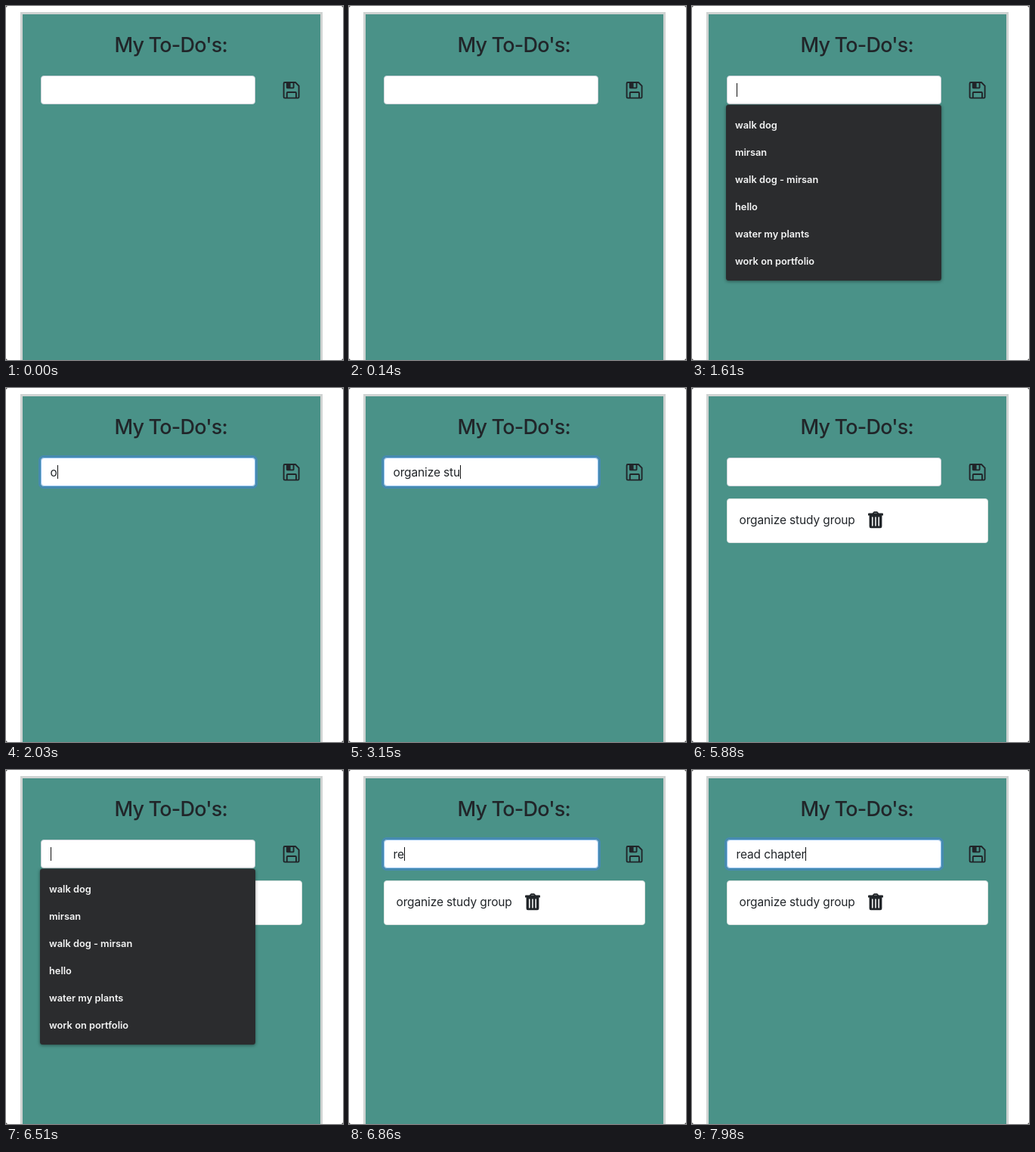
These frames come from a looping animation (446 by 468 pixels, 8000 ms). An HTML page:

```html
<!DOCTYPE html>
<html lang="en">
<head>
<meta charset="utf-8">
<title>To-do list</title>
<style>
  html, body { margin: 0; width: 100%; height: 100%; overflow: hidden; background: #fff; }
  svg { display: block; width: 446px; height: 468px; }
  text { font-family: Inter, sans-serif; font-optical-sizing: none; fill: #212529; white-space: pre; }
  .title { font-size: 27px; font-weight: 500; letter-spacing: -.8px; text-anchor: middle; }
  .body { font-size: 15.5px; letter-spacing: -.13px; }
  .menu text { font-size: 12.8px; font-weight: 600; fill: #f4f5f5; }
  .menu rect { filter: drop-shadow(0 1px 2px rgba(0, 0, 0, .45)); }
  .ring { fill: none; stroke: #468ab0; stroke-width: 3.2; }
  .icon { fill: none; stroke: #212529; stroke-width: 1.9; stroke-linejoin: round; stroke-linecap: round; }
  .solid { fill: #212529; stroke: none; }
</style>
</head>
<body>
<svg viewBox="0 0 446 468">
  <path d="M0 0h2L0 2zM446 0h-2l2 2zM0 468h2l-2-2zM446 468h-2l2-2z" fill="#555"/>
  <rect x="20.5" y="9.5" width="397" height="480" fill="#4a9288" stroke="#cfd3d2" stroke-width="3"/>
  <text class="title" x="218.2" y="61">My To-Do's:</text>

  <g class="icon">
    <path d="M369 101H383L387.6 105.6V120.3Q387.6 121.6 386.3 121.6H369Q367.6 121.6 367.6 120.3V102.4Q367.6 101 369 101Z"/>
    <path d="M371.8 121V115Q371.8 114 372.8 114H383Q384 114 384 115V121"/>
    <path d="M371.8 101.5V107.4Q371.8 108.4 372.8 108.4H379.6Q380.6 108.4 380.6 107.4V101.5"/>
    <path class="solid" d="M372 101H376.6V108.4H372Z"/>
  </g>
  <rect id="saveRing" class="ring" x="351.8" y="89.6" width="52" height="45.8" rx="4.5"/>

  <rect id="inputRing" class="ring" x="44.6" y="90.6" width="286.8" height="40.8" rx="5"/>
  <rect x="46.5" y="92.5" width="283" height="37" rx="3.5" fill="#fff" stroke="#ced4da"/>
  <rect id="inputEdge" x="46.5" y="92.5" width="283" height="37" rx="3.5" fill="none" stroke="#8fbfee"/>
  <text id="typed" class="body" x="58.5" y="117"></text>
  <rect id="caret" y="102" width="1" height="18" fill="#111"/>

  <g id="item">
    <rect x="46.5" y="146.5" width="345" height="58" rx="3.5" fill="#fff" stroke="#dbe3e1"/>
    <text class="body" x="62.5" y="180">organize study group</text>
    <path class="icon" d="M239.6 166L241 164.3H245L246.4 166"/>
    <path class="solid" d="M234 165.4H252Q253 165.4 253 166.4V168.4H233V166.4Q233 165.4 234 165.4Z"/>
    <path class="solid" d="M234.6 168H251.4V183Q251.4 185.2 249.2 185.2H236.8Q234.6 185.2 234.6 183Z"/>
    <path d="M238.8 171V182M243 171V182M247.2 171V182" stroke="#fff" stroke-width="1.5" stroke-linecap="round"/>
  </g>

  <g id="menu" class="menu">
    <rect x="45" y="130.5" width="285" height="232.5" rx="3.5" fill="#2b2c2e"/>
  </g>
</svg>
<script>
  const LOOP = 8000, TICK = 70;
  const $ = id => document.getElementById(id);
  const ui = {};
  for (const id of ['saveRing', 'inputRing', 'inputEdge', 'typed', 'caret', 'item', 'menu']) ui[id] = $(id);

  const options = ['walk dog', 'mirsan', 'walk dog - mirsan', 'hello', 'water my plants', 'work on portfolio'];
  options.forEach((label, i) => {
    const row = document.createElementNS('http://www.w3.org/2000/svg', 'text');
    row.setAttribute('x', 57);
    row.setAttribute('y', 162 + 36 * i);
    row.textContent = label;
    ui.menu.append(row);
  });

  // Key presses: [time, characters typed so far]
  const entries = [
    { text: 'organize study group', end: 5880, keys: [
      [2030, 1], [2100, 2], [2310, 3], [2380, 4], [2450, 5], [2520, 6], [2590, 7], [2730, 8], [2870, 9],
      [2940, 10], [3080, 11], [3150, 12], [3290, 13], [3360, 15], [3500, 16], [3640, 17], [3780, 19], [3920, 20]] },
    { text: 'read chapter', end: LOOP, keys: [
      [6790, 1], [6860, 2], [6930, 3], [7070, 4], [7140, 5], [7350, 7], [7490, 8], [7560, 9],
      [7700, 10], [7840, 11], [7980, 12]] }
  ];

  const within = (t, a, b) => t >= a && t < b;
  const ramp = (t, start, length) => Math.min(1, Math.max(0, (t - start) / length));
  const show = (el, on) => el.setAttribute('visibility', on ? 'visible' : 'hidden');

  function typedAt(t) {
    const entry = entries.find(e => within(t, e.keys[0][0], e.end));
    if (!entry) return '';
    const [, count] = entry.keys.filter(k => k[0] <= t).pop();
    return entry.text.slice(0, count);
  }

  function draw(t) {
    const step = Math.floor(t / TICK) * TICK;
    const text = typedAt(t);
    if (ui.typed.textContent !== text) ui.typed.textContent = text;

    const width = text ? ui.typed.getComputedTextLength() : 0;
    ui.caret.setAttribute('x', Math.round(58.7 + width));
    show(ui.caret, within(t, 1610, 4480) || t >= 6510);
    show(ui.menu, within(t, 1610, 2030) || within(t, 6510, 6790));
    show(ui.item, t >= 5880);

    const blur = ramp(step, 5040, 140);
    const focus = ramp(step, 1610, 140) - blur + ramp(step, 6510, 70);
    ui.inputRing.setAttribute('opacity', focus);
    ui.inputEdge.setAttribute('opacity', focus);
    ui.saveRing.setAttribute('opacity', t < 5880 ? blur : 0);
  }

  const start = performance.now();
  function frame() {
    draw((performance.now() - start) % LOOP);
    requestAnimationFrame(frame);
  }
  frame();
</script>
</body>
</html>
```
